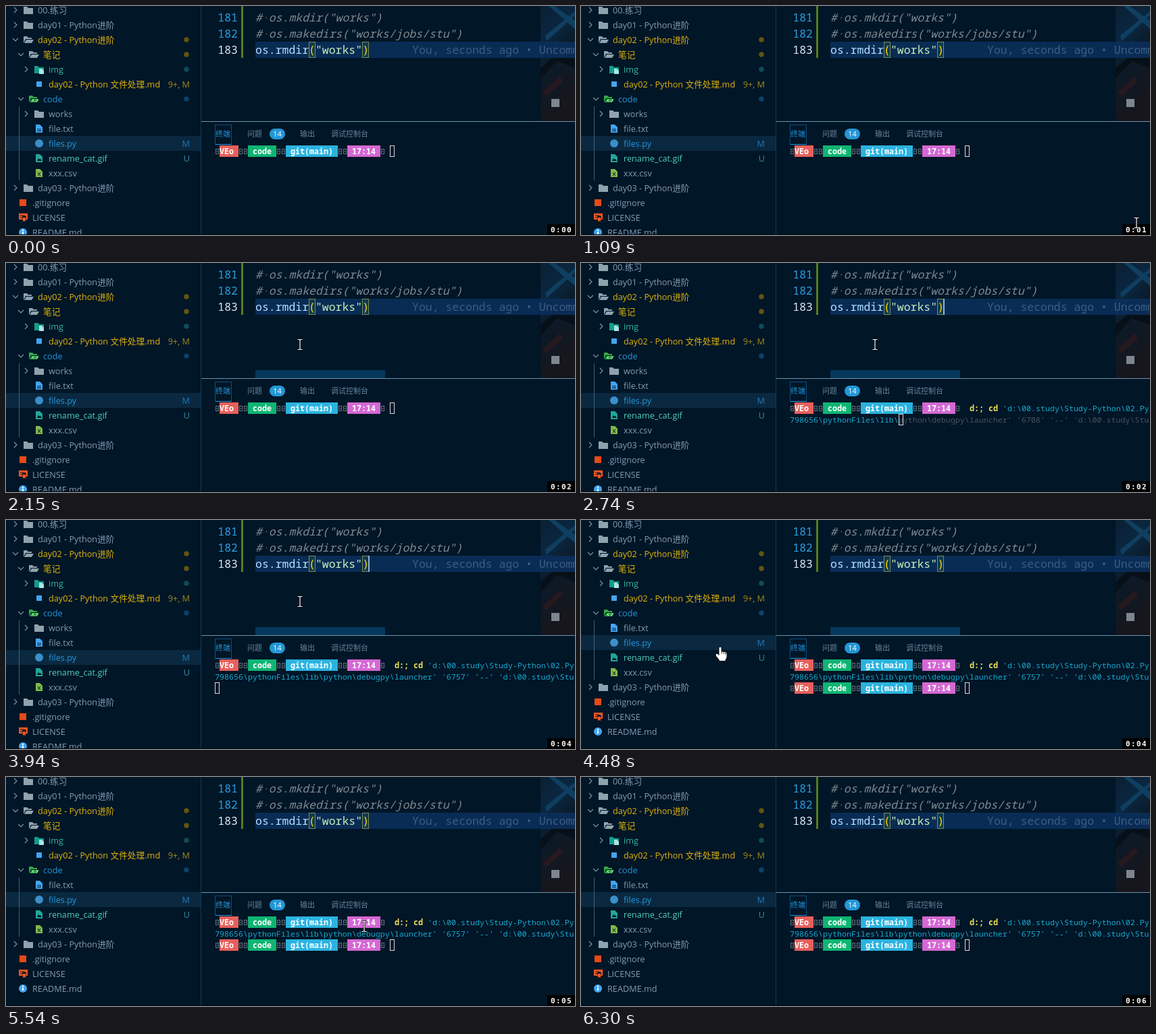
Write an HTML page that moves like this. It is 842x340 px and loops after 6.7 s.

```html
<!DOCTYPE html>
<html lang="zh">
<head>
<meta charset="utf-8">
<title>os.rmdir</title>
<style>
html, body { margin: 0; width: 100%; height: 100%; overflow: hidden; background: #011627; }
svg { display: block; width: 842px; height: 340px; }
text { white-space: pre; }
.ui { font: 12.7px "Open Sans", "Noto Sans CJK SC", "Noto Sans CJK", sans-serif; }
.tab { font: 11px "Open Sans", "Noto Sans CJK SC", "Noto Sans CJK", sans-serif; }
.code { font: 16.48px "Noto Sans Mono", monospace; }
.term { font: 11.67px "Noto Sans Mono", monospace; }
.clock { font: bold 11px "DejaVu Sans Mono", monospace; letter-spacing: 1.4px; }
.it { font-style: italic; }
.b { font-weight: bold; }
</style>
</head>
<body>
<svg id="stage" viewBox="0 0 842 340"></svg>
<script>
const LOOP = 6700;
const STEPS = [0, 990, 1100, 1210, 1360, 1480, 1630, 1750, 2000, 2150, 2740, 2860, 2980, 3130, 3660, 3940,
  4090, 4210, 4360, 4480, 4630, 4780, 4930, 5050, 5150, 5270, 5390, 5540, 5660, 5810, 5920, 6030, 6300];
const CARET = [1630, 2150, 2740, 3130, 3660, 4210, 4630, 5270, 5810, 6300];
const POINTER = [
  [0, -50, -50, 'beam'], [990, 822, 322, 'beam'], [1100, 560, 262, 'beam'], [1210, 366, 205, 'beam'],
  [1360, 327, 196, 'beam'], [1480, 395, 143, 'beam'], [1630, 428, 125, 'beam'], [1750, 435, 121, 'beam'],
  [4360, 312, 168, 'beam'], [4480, 206, 188, 'hand'], [4630, 132, 158, 'hand'], [4780, 109, 135, 'hand'],
  [5390, 300, 190, 'beam'], [5540, 530, 222, 'beam'], [5660, 722, 246, 'beam'], [5810, 812, 312, 'beam'],
  [5920, -50, -50, 'beam']];

const GREY = '#849db3', GOLD = '#ddb40c', BLUE = '#2496dc', TEAL = '#4fd0bb', CYAN = '#1aa9d0';
const GUIDE = '#17364d', ACTIVE_GUIDE = '#3d607b';

const text = (x, y, cls, fill, s, more = '') => `<text x="${x}" y="${y}" class="${cls}" fill="${fill}" ${more}>${s}</text>`;
const span = (fill, s, cls = '') => `<tspan fill="${fill}" class="${cls}">${s}</tspan>`;
const rect = (x, y, w, h, fill, more = '') => `<rect x="${x}" y="${y}" width="${w}" height="${h}" fill="${fill}" ${more}/>`;
const path = (d, fill, more = '') => `<path d="${d}" fill="${fill}" ${more}/>`;
const dot = (x, y, r, fill) => `<circle cx="${x}" cy="${y}" r="${r}" fill="${fill}"/>`;
const line = (x, y1, y2, color) => rect(x, y1, 1, y2 - y1, color);
const group = (id, s) => `<g id="${id}">${s}</g>`;

// File tree. Icons take the left edge and the row's centre.
const folder = c => (x, y) => path(`M${x} ${y - 5}h5l2 2h7v9h-14z`, c);
const openFolder = (c, mark = '') => (x, y) =>
  path(`M${x} ${y + 5}v-10h5l2 2h5v2h-9zM${x + 1} ${y + 5}l3-5h11l-3 5z`, c) +
  (mark && path(`M${x + 7} ${y}l-2 2 2 2m4-4l2 2-2 2`, 'none', `stroke="${mark}"`));
const sheet = (c, mark) => (x, y) =>
  path(`M${x + 2} ${y - 6}h6l4 4v8h-10z`, c) + path(mark(x, y), 'none', 'stroke="#011627"');
const lines = (x, y) => `M${x + 4} ${y + 1}h6m-6 2.5h6`;
const cross = (x, y) => `M${x + 5} ${y - 1}l4 5m0-5l-4 5`;
const picture = (x, y) => path(`M${x + 2} ${y - 6}h6l4 4v8h-10z`, '#22a79a') +
  path(`M${x + 4} ${y + 4}l2-4 2 2 1-1 2 3z`, '#011627');
const imageFolder = (x, y) => folder('#129b8e')(x, y) + path(`M${x + 7} ${y - 1}h4l3 3v5h-7z`, '#a9e6dc');
const square = (c, s) => (x, y) => rect(x + 7 - s / 2, y - s / 2, s, s, c);
const disc = c => (x, y) => dot(x + 7, y, 6, c);
const seal = (x, y) => rect(x + 1, y - 6, 13, 9, '#ff5722') + dot(x + 9, y, 3, '#011627') +
  path(`M${x + 7} ${y}h4v6l-2-1-2 1z`, '#ff5722') + path(`M${x + 3} ${y - 3}h5m-5 3h3`, 'none', 'stroke="#011627"');
const info = (x, y) => disc('#42a5f5')(x, y) + rect(x + 6, y - 1, 2, 4, '#fff') + rect(x + 6, y - 4, 2, 2, '#fff');

const grey = folder('#8fa3ae'), pale = openFolder('#8fa3ae');
const rows = [
  [47, '>', grey, '00.练习', GREY],
  [47, '>', grey, 'day01 - Python进阶', GREY],
  [47, 'v', pale, 'day02 - Python进阶', GOLD, '', '#62540f'],
  [55, 'v', pale, '笔记', GOLD, '', '#62540f'],
  [63, '>', imageFolder, 'img', '#35b5a6', '', '#0f4c5c'],
  [63, '', square('#42a5f5', 8), 'day02 - Python 文件处理.md', GOLD, '9+, M', '#a18a1c'],
  [55, 'v', openFolder('#35a948', '#d5f5d8'), 'code', BLUE, '', '#0d4268'],
  [63, '>', grey, 'works', GREY],
  [63, '', sheet('#42a5f5', lines), 'file.txt', GREY],
  [63, '', disc('#3b8fca'), 'files.py', BLUE, 'M', '#1f78b8'],
  [63, '', picture, 'rename_cat.gif', TEAL, 'U', '#2f8fa6'],
  [63, '', sheet('#7fb84c', cross), 'xxx.csv', GREY],
  [47, '>', grey, 'day03 - Python进阶', GREY],
  [39, '', square('#e64a19', 10), '.gitignore', GREY],
  [39, '', seal, 'LICENSE', GREY],
  [39, '', info, 'README.md', GREY]];

const treeRow = ([x, arrow, icon, name, color, badge, badgeColor], i) => {
  const y = 6 + 22 * i, c = x - 33;
  const chevron = arrow == '>' ? `M${c - 2} ${y - 4}l4 4-4 4` : `M${c - 4} ${y - 2}l4 4 4-4`;
  return (arrow && path(chevron, 'none', 'stroke="#7f97aa" stroke-width="1.1"')) +
    icon(x - 21, y) + text(x, y + 4.5, 'ui', color, name) +
    (badge ? text(272, y + 4.5, 'ui', badgeColor, badge, 'text-anchor="end"') : badgeColor ? dot(267, y, 3.8, badgeColor) : '');
};
const treeRows = rows.map(treeRow);

const tree =
  group('guides', line(3, 0, 259, GUIDE) + line(11, 61, 237, GUIDE) + line(19, 83, 127, GUIDE)) +
  treeRows.slice(0, 7).join('') +
  group('works', line(19, 149, 171, ACTIVE_GUIDE) + treeRows[7]) +
  group('below', rect(0, 193, 289, 22, '#0a2940') + line(19, 171, 259, ACTIVE_GUIDE) + treeRows.slice(8).join('')) +
  rect(.5, 127.5, 288, 21, 'none', 'id="hover" stroke="#1b4664" stroke-dasharray="2 2"');

// Editor
const bracket = x => rect(x + .5, 53.5, 9, 23, '#0f3a52', 'stroke="#7b8a55"');
const comment = (y, s) => text(369, y, 'code it', '#7f8a90', '#' + span('#4a565e', '·') + s);
const backdrop = rect(791, 0, 51, 171, 'url(#photo)') +
  path('M812 0L842 22V34L803 0zM798 44L842 8V14L800 52z', '#0f3f60') +
  path('M791 92L826 62L842 74V92L815 82L791 108z', '#071019') +
  path('M794 128L820 104L824 112L800 134z', '#261920');
const editor =
  backdrop + rect(807, 138, 12, 12, '#7d868e') +
  rect(369, 53, 473, 24, '#0a2e5a', 'fill-opacity=".92"') + rect(348, 0, 3, 77, '#587c1c') +
  [181, 182, 183].map((n, i) => text(343, 23 + 24 * i, 'code', i < 2 ? '#2b9fe0' : '#dcebf7', n, 'text-anchor="end"')).join('') +
  comment(23, 'os.mkdir("works")') + comment(47, 'os.makedirs("works/jobs/stu")') +
  bracket(448) + bracket(527) +
  text(369, 71, 'code', '#b4e2ff', 'os.rmdir' + span('#ffd700', '(') + span('#c8f2ba', '"works"') + span('#ffd700', ')')) +
  text(601, 71, 'code', '#3c5d80', 'You, seconds ago • Uncommitted') +
  rect(536, 53, 2, 24, '#8fb4d4', 'id="caret"') +
  rect(369, 159, 192, 12, '#05385c', 'id="scroll"');

// Terminal: cells of 7 by 17 from (309, 207)
const cell = n => 309 + 7 * n;
const base = row => 219.5 + 17 * row;
const segments = [[1, 4, '#e8605c', 'VEo'], [7, 6, '#0fb573', ' code'], [15, 11, '#2ab3e0', ' git(main)'], [28, 7, '#d468d4', ' 17:14']];
const prompt = row => {
  const top = 207 + 17 * row;
  return segments.map(([at, n, fill, s]) =>
    rect(cell(at), top, 7 * n, 17, fill) + text(cell(at), base(row), 'term b', '#fff', s)).join('') +
    [0, 5, 6, 13, 14, 26, 27, 35].map(n =>
      rect(cell(n) + 1.5, top + 5.5, 4, 7, 'none', 'stroke="#66727c"') + rect(cell(n) + 3, top + 8, 1, 2, '#66727c')).join('');
};
const start = String.raw`798656\pythonFiles\lib` + '\\';
const rest = port => String.raw`python\debugpy\launcher' '${port}' '--' 'd:\00.study\Stu`;
const tabs = [[310, '终端', BLUE], [357, '问题'], [435, '输出'], [481, '调试控制台']];
const terminal =
  rect(289, 171, 553, 1, '#6d93ad') + line(288, 0, 340, '#0f3a5a') +
  rect(309.5, 176.5, 24, 29, 'none', 'stroke="#0b4f80"') + rect(310, 205, 24, 1, BLUE) +
  tabs.map(([x, s, c = '#68859d']) => text(x, 194, 'tab', c, s)).join('') +
  rect(390, 182, 23, 16, '#2397d6', 'rx="8"') + text(401.5, 194, 'tab', '#fff', '14', 'text-anchor="middle"') +
  prompt(0) +
  group('command', text(cell(38), base(0), 'term', CYAN,
    span('#f0e35a', 'd:; cd ', 'b') + String.raw`'d:\00.study\Study-Python\02.Py`)) +
  group('typing', text(309, base(1), 'term', CYAN, start + span('#47545e', rest(6708)))) +
  group('typed', text(309, base(1), 'term', CYAN, start + rest(6757))) +
  group('again', prompt(2)) +
  rect(.5, .5, 6, 16, 'none', 'id="block" stroke="#d5dce0"');

const beam = 'M-3.5-7.5h2.5l1 1 1-1h2.5M0-6.5V6.5M-3.5 7.5h2.5l1-1 1 1h2.5';
const hand = 'M-2 1.5Q0-1.5 2 1.5V7q5 0 6.5 1.5 1.5.5 1.5 3v3q0 3-2 5v2h-9q-1-3-5-7-2-3 0-4t4 2Z';

document.getElementById('stage').innerHTML =
  `<defs><linearGradient id="photo" x2=".3" y2="1"><stop stop-color="#0a1f33"/><stop offset=".3" stop-color="#0a2740"/>
   <stop offset=".55" stop-color="#0b1a28"/><stop offset="1" stop-color="#17161c"/></linearGradient></defs>` +
  rect(0, 0, 842, 340, '#011627') + tree + editor + terminal + rect(0, 339, 842, 1, '#000a14') +
  rect(801, 324, 41, 16, '#000') + text(806, 335.5, 'clock', '#fff', '', 'id="clock"') +
  group('beam', path(beam, 'none', 'stroke="#000" stroke-width="2.6"') + path(beam, 'none', 'stroke="#fff" stroke-width="1.2"')) +
  group('hand', path(hand, '#fff', 'stroke="#111"') + path('M2 7v4M5 8v3M7.5 9v3', 'none', 'stroke="#111" stroke-width=".8"'));

const $ = id => document.getElementById(id);
const show = (id, on) => $(id).setAttribute('visibility', on ? 'visible' : 'hidden');
const move = (id, x, y) => $(id).setAttribute('transform', `translate(${x} ${y})`);
const clamp = v => Math.max(0, Math.min(1, v));
const lastAt = (list, t) => list.filter(k => k[0] <= t).pop();
const BLOCK = [[0, 37, 0], [2740, 23, 1], [2860, 80, 1], [2980, 0, 2], [4360, 37, 2]];

function draw(t) {
  const removed = t >= 4090;
  show('works', !removed);
  move('below', 0, removed ? -22 : 0);
  show('guides', t >= 4630 && t < 5540);
  show('hover', t >= 4630 && t < 5390);
  move('hover', 0, t < 4780 ? 22 : 0);

  show('caret', CARET.filter(s => s <= t).length % 2);
  $('scroll').setAttribute('opacity', Math.min(clamp((t - 1300) / 330), clamp((5300 - t) / 600)));

  show('command', t >= 2740);
  show('typing', t >= 2740 && t < 2860);
  show('typed', t >= 2860);
  show('again', t >= 4360);
  const [, column, row] = lastAt(BLOCK, t);
  move('block', cell(column), 207 + 17 * row);

  const [, x, y, kind] = lastAt(POINTER, t);
  for (const id of ['beam', 'hand']) {
    show(id, id == kind);
    move(id, x, y);
  }
  $('clock').textContent = '0:0' + Math.floor((t + 60) / 1000);
}

const origin = performance.now();
function tick() {
  const t = (performance.now() - origin) % LOOP;
  draw(STEPS.filter(s => s <= t).pop());
  requestAnimationFrame(tick);
}
draw(0);
tick();
</script>
</body>
</html>
```
